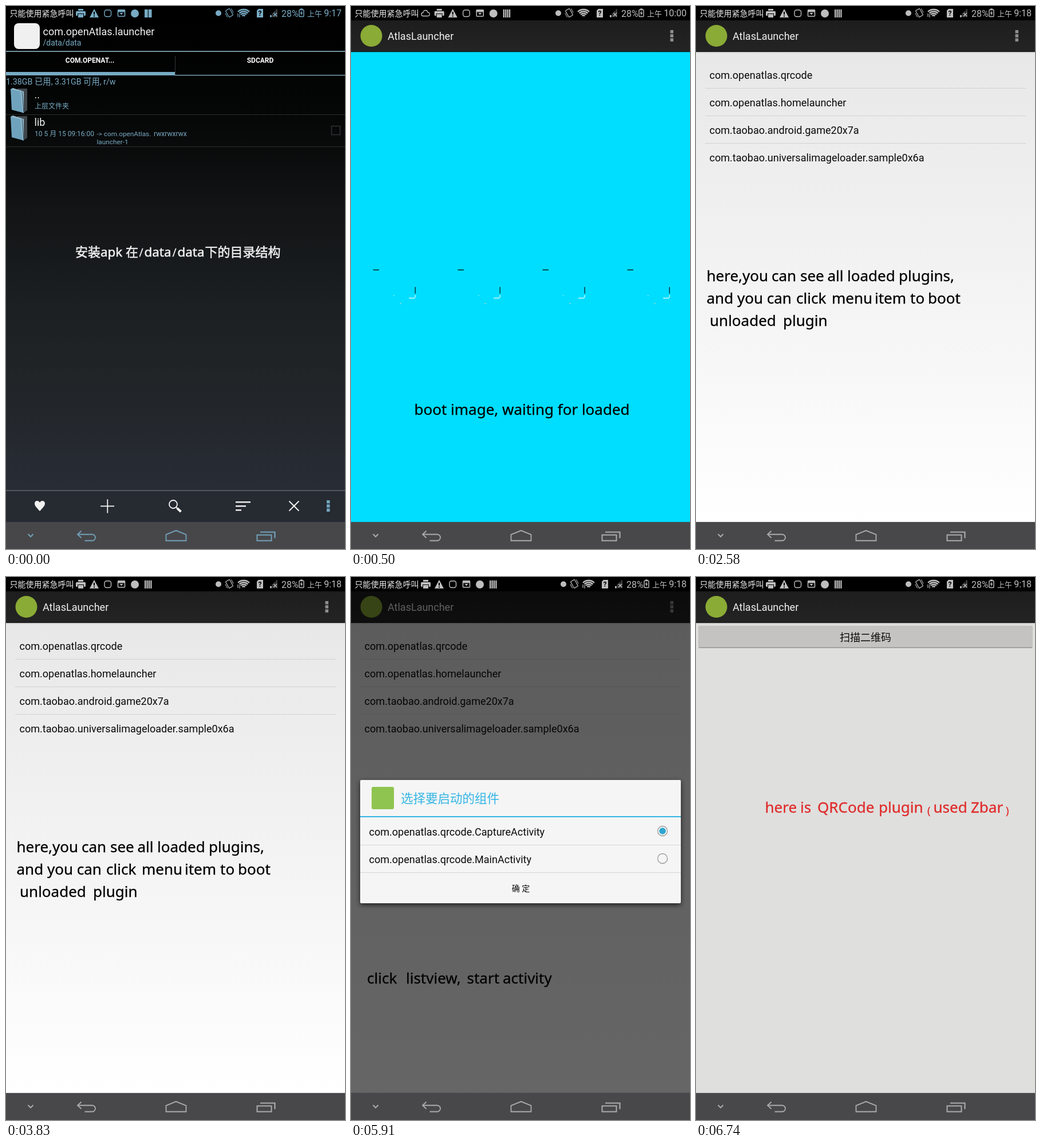
An HTML page with a canvas that plays this animation: 592x947 px, repeating every 8 s.

```html
<!DOCTYPE html>
<html lang="zh-CN">
<head>
<meta charset="utf-8">
<title>Plugin launcher demo</title>
<style>
html, body { margin: 0; width: 100%; height: 100%; overflow: hidden; background: #000; }
canvas { display: block; }
</style>
</head>
<body>
<canvas id="stage" width="592" height="947"></canvas>
<script>
const W = 592, H = 947, LOOP = 8000;
const g = document.getElementById('stage').getContext('2d');
const UI = 'Roboto, "Noto Sans CJK SC", "Noto Sans CJK", sans-serif';
const NOTE = '"Noto Sans", "Noto Sans CJK SC", "Noto Sans CJK", sans-serif';

function rect(x, y, w, h, color) {
  g.fillStyle = color;
  g.fillRect(x, y, w, h);
}

function text(s, x, y, size, color, align = 'left', weight = 400) {
  g.font = `${weight} ${size}px ${UI}`;
  g.textAlign = align;
  g.fillStyle = color;
  g.fillText(s, x, y);
}

// Caption words, given as [word, x] pairs on one baseline.
function note(words, y, color, size = 26, edge = 0.3) {
  g.font = `400 ${size}px ${NOTE}`;
  g.textAlign = 'left';
  g.fillStyle = g.strokeStyle = color;
  g.lineWidth = edge;
  for (const [s, x] of words) {
    g.fillText(s, x, y);
    g.strokeText(s, x, y);
  }
}

function path(pts, closed) {
  g.beginPath();
  for (let i = 0; i < pts.length; i += 2) g.lineTo(pts[i], pts[i + 1]);
  if (closed) g.closePath();
}

function poly(pts, color) {
  path(pts, true);
  g.fillStyle = color;
  g.fill();
}

function line(pts, color, width = 1, closed = false) {
  path(pts, closed);
  g.strokeStyle = color;
  g.lineWidth = width;
  g.stroke();
}

function disc(x, y, r, color) {
  g.beginPath();
  g.arc(x, y, r, 0, Math.PI * 2);
  g.fillStyle = color;
  g.fill();
}

function ring(x, y, r, color, width) {
  g.beginPath();
  g.arc(x, y, r, 0, Math.PI * 2);
  g.strokeStyle = color;
  g.lineWidth = width;
  g.stroke();
}

function round(x, y, w, h, r) {
  g.beginPath();
  g.roundRect(x, y, w, h, r);
}

function fade(y0, y1, ...stops) {
  const grad = g.createLinearGradient(0, y0, 0, y1);
  stops.forEach((c, i) => grad.addColorStop(i / (stops.length - 1), c));
  return grad;
}

function at(x, y, draw) {
  g.save();
  g.translate(x, y);
  draw();
  g.restore();
}

// ---- status bar ----

function cloud(c) {
  g.beginPath();
  g.moveTo(126, 17.5);
  g.arc(126, 14.5, 3, Math.PI / 2, Math.PI * 1.5);
  g.arc(130, 11.5, 4, Math.PI, Math.PI * 1.9);
  g.arc(134, 14.3, 3.2, -Math.PI / 2, Math.PI / 2);
  g.closePath();
  g.strokeStyle = c;
  g.lineWidth = 1.3;
  g.stroke();
}

function notices(c, bars) {
  // printer
  rect(126, 5, 9, 3, c);
  round(122, 9, 17, 8, 1.5);
  g.fillStyle = c;
  g.fill();
  rect(125, 13, 11, 7, '#000');
  rect(126, 14, 9, 6, c);
  // warning
  poly([154, 5, 162, 20, 146, 20], c);
  rect(153, 10, 2, 5, '#000');
  rect(153, 16.5, 2, 2, '#000');
  // app
  round(172, 7, 11.5, 11.5, 3.5);
  g.strokeStyle = c;
  g.lineWidth = 1.4;
  g.stroke();
  // inbox
  round(195.5, 7, 12, 11, 1);
  g.lineWidth = 1.5;
  g.stroke();
  rect(195, 6.5, 13, 4, c);
  poly([198.5, 12, 204.5, 12, 201.5, 15.5], c);
  // player
  disc(225, 13, 7, c);
  // bars
  const step = 13.6 / bars;
  for (let i = 0; i < bars; i++) rect(242 + i * step, 6, step - 1.1, 14, c);
}

function radios(c, arrows) {
  disc(371, 12.5, 5, c);
  // vibrate
  at(390, 12, () => {
    g.rotate(-0.5);
    round(-4, -6.5, 8, 13, 1);
    g.strokeStyle = c;
    g.lineWidth = 1.2;
    g.stroke();
    line([-6.5, -3, -6.5, 5], c, 1);
    line([6.5, -5, 6.5, 3], c, 1);
  });
  // wifi
  for (const r of [3.5, 7, 10.5, 14]) {
    g.beginPath();
    g.arc(415, 20, r, -Math.PI * 0.75, -Math.PI * 0.25);
    g.strokeStyle = c;
    g.lineWidth = 2.3;
    g.stroke();
  }
  if (arrows) {
    line([405, 13, 405, 19], c, 1.2);
    line([408, 14, 408, 20], c, 1.2);
  }
  // sim
  poly([441, 5, 449, 5, 449, 20, 438, 20, 438, 8], c);
  text('?', 443.5, 17, 12, '#000', 'center', 700);
  // signal
  for (let i = 0; i < 4; i++) rect(461 + i * 3.4, 16 - i * 3.5, 2.8, 3.5 + i * 3.5, i ? '#3c3c3c' : c);
  line([467, 12, 473, 18], c, 1.4);
  line([473, 12, 467, 18], c, 1.4);
  text('28%', 481, 18.5, 16, c);
  // battery
  rect(514, 4.5, 4, 2, c);
  round(512, 6.5, 8, 12, 1);
  g.strokeStyle = c;
  g.lineWidth = 1.4;
  g.stroke();
  poly([517, 8, 513.5, 13, 515.6, 13, 514.7, 17, 518.4, 11.8, 516.3, 11.8], c);
  text('上午', 526, 18, 13, c);
}

function statusBar(time, c = '#bebebe', bars = 4, busy = false) {
  rect(0, 0, W, 25, '#000');
  text('只能使用紧急呼叫', 6.5, 17.5, 14, '#e8e8e8');
  if (busy) cloud(c);
  at(busy ? 23.7 : 0, 0, () => notices(c, bars));
  at(busy ? -9 : 0, 0, () => radios(c, !busy));
  text(time, 586, 18, 16, c, 'right');
}

// ---- shared chrome ----

function navBar(c = '#ababab', bg = '#48484a') {
  rect(0, 899.84, W, 48, bg);
  line([38.5, 921, 43, 925.5, 47.5, 921], c, 2);
  line([131.5, 915.5, 125, 921.5, 131.5, 927.5], c, 1.8);
  g.beginPath();
  g.moveTo(125, 921.5);
  g.lineTo(150.5, 921.5);
  g.arc(150.5, 927, 5.5, -Math.PI / 2, Math.PI / 2);
  g.lineTo(137.5, 932.5);
  g.stroke();
  line([279.5, 921.8, 297, 914.8, 314.5, 921.8, 314.5, 932.5, 279.5, 932.5], c, 1.8, true);
  line([438.5, 922.5, 463.5, 922.5, 463.5, 932.5, 438.5, 932.5], c, 2, true);
  line([444, 917.5, 469.5, 917.5, 469.5, 928], c, 2.2);
}

function dots(x, y, c) {
  for (let i = 0; i < 3; i++) rect(x, y + i * 7.2, 5.5, 5.5, c);
}

function actionBar(menu = true) {
  rect(0, 25, W, 55, fade(25, 80, '#1d1d1d', '#242424'));
  rect(0, 79, W, 1, '#101010');
  rect(0, 80, W, 2, fade(80, 82, 'rgba(0,0,0,.25)', 'rgba(0,0,0,0)'));
  disc(35.5, 52, 19, '#8aab35');
  text('AtlasLauncher', 64, 59, 18, '#f0f0f0');
  if (menu) dots(557.5, 42, '#8e8e8e');
}

// ---- scenes ----

function folder(y) {
  at(0, y, () => {
    poly([20, 1, 37, 1, 37, 39, 31, 43, 20, 38], '#3f474c');
    poly([8, 2, 12, 0, 31, 6, 31, 44, 27, 42], '#94bccf');
    poly([8, 2, 25, 6, 29, 43, 10, 38], '#6fa3bd');
    line([28, 6, 31, 43], '#2c4653', 1);
  });
}

function fileTools() {
  const c = '#f2f2f2';
  rect(0, 845, W, 55, '#262a31');
  rect(0, 844.5, W, 1.2, '#6f7478');
  g.beginPath();
  g.moveTo(59, 881);
  g.bezierCurveTo(54, 875, 50, 872, 50, 867.5);
  g.bezierCurveTo(50, 862, 57, 861.5, 59, 866);
  g.bezierCurveTo(61, 861.5, 68, 862, 68, 867.5);
  g.bezierCurveTo(68, 872, 64, 875, 59, 881);
  g.fillStyle = c;
  g.fill();
  rect(165, 871.4, 24, 1.8, c);
  rect(176.4, 860.3, 1.8, 24, c);
  ring(292, 869, 7, c, 1.8);
  line([297, 874, 300, 877], c, 2);
  line([299, 876, 305.5, 882], c, 4);
  [26, 18, 10].forEach((w, i) => rect(401, 864 + i * 7, w, 2.4, c));
  line([494.5, 863.5, 511.5, 880.5], c, 2);
  line([511.5, 863.5, 494.5, 880.5], c, 2);
  dots(560, 862, '#72a6c0');
}

function files() {
  const blue = '#78abc4';
  rect(0, 0, W, 900, fade(25, 845, '#000', '#050606', '#121415', '#1b1f21', '#22262a', '#282c35'));
  statusBar('9:17', blue, 2);
  round(14, 30, 45, 45, 8);
  g.fillStyle = '#f0f0f0';
  g.fill();
  text('com.openAtlas.launcher', 64.5, 50.5, 18, '#f2f2f2');
  text('/data/data', 64.5, 69, 14, blue);
  rect(0, 78.4, W, 1.6, '#8db3c2');
  text('COM.OPENAT...', 146.5, 98.5, 12, '#fff', 'center', 700);
  text('SDCARD', 444, 98.5, 12, '#fff', 'center', 700);
  rect(295, 87, 1, 33, '#303436');
  rect(0, 115, 295, 6, blue);
  rect(295, 120, 297, 1.4, '#7fa6b5');
  text('1.38GB 已用, 3.31GB 可用, r/w', 0, 137, 14.3, blue);

  folder(143);
  text('..', 49.5, 161, 18, '#f2f2f2');
  text('上层文件夹', 50, 179, 12, blue);
  rect(0, 189, W, 1, '#2a2d2e');
  folder(191);
  text('lib', 49.5, 209, 18, '#f2f2f2');
  text('10 5 月 15 09:16:00', 50, 227, 12, blue);
  text('-> com.openAtlas.', 158.5, 227, 11.8, blue);
  text('launcher-1', 158.5, 241, 11.8, blue);
  text('rwxrwxrwx', 258, 227, 12.1, blue);
  rect(0, 245, W, 1, '#2a2d2e');
  line([568.5, 209.5, 583.5, 209.5, 583.5, 224.5, 568.5, 224.5], '#303234', 1.5, true);

  note([['安装', 121], ['在', 209], ['下的目录结构', 347.5]], 437, '#eee', 22, 0.6);
  note([['apk', 165], ['data', 241.5], ['data', 299.5]], 437, '#eee', 22.4, 0.6);
  note([['/', 232.5], ['/', 290.5]], 437, '#eee', 19);
  fileTools();
  navBar('#72a2ba', '#47474a');
}

function boot() {
  rect(0, 80, W, 820, '#00deff');
  statusBar('10:00', undefined, 4, true);
  actionBar();
  for (let i = 0; i < 4; i++) {
    at(i * 148, 0, () => {
      rect(38.5, 459.5, 10.5, 1.6, '#0a2a30');
      rect(111.5, 490, 1.4, 11.5, '#0a2a30');
      line([101, 509.5, 110, 509.5, 112, 508, 112.3, 504], '#d5f6fa', 1.3);
      rect(74, 504, 1.5, 1.5, '#9ceef8');
      rect(85.5, 518, 2, 2, '#9fd8c8');
    });
  }
  note([['boot image, waiting for loaded', 110.5]], 713, '#000');
  navBar();
}

function pluginList() {
  rect(0, 80, W, 820, fade(80, 900, '#e8e8e8', '#ffffff'));
  statusBar('9:18');
  actionBar();
  const names = ['com.openatlas.qrcode', 'com.openatlas.homelauncher',
    'com.taobao.android.game20x7a', 'com.taobao.universalimageloader.sample0x6a'];
  names.forEach((s, i) => {
    text(s, 23.5, 126.5 + i * 48, 18.05, '#0a0a0a');
    if (i) rect(16, 95 + i * 48, 560, 1, '#d2d2d2');
  });
  navBar();
}

function listing() {
  pluginList();
  note([['here,you', 18.5], ['can', 132], ['see', 182], ['all', 229.5], ['loaded', 264], ['plugins,', 354]], 479.5, '#000');
  note([['and you can', 18.5], ['click', 175], ['menu', 237], ['item', 312], ['to', 374], ['boot', 405]], 519, '#000');
  note([['unloaded', 24], ['plugin', 152]], 558, '#000');
}

function chooser() {
  pluginList();
  rect(0, 25, W, 875, 'rgba(0,0,0,.6)');
  navBar();
  g.save();
  g.shadowColor = 'rgba(0,0,0,.7)';
  g.shadowBlur = 8;
  g.shadowOffsetY = 3;
  round(16, 354, 560, 215, 2);
  g.fillStyle = '#f5f5f5';
  g.fill();
  g.restore();
  round(36, 366, 39, 39, 3);
  g.fillStyle = '#8fc450';
  g.fill();
  text('选择要启动的组件', 87, 394, 21.5, '#33b5e5');
  rect(16, 417, 560, 2, '#33b5e5');
  ['CaptureActivity', 'MainActivity'].forEach((s, i) => {
    const y = 443 + i * 48;
    text('com.openatlas.qrcode.' + s, 31.5, y + 7.5, 18.05, '#0a0a0a');
    ring(544, y, 8.5, '#9a9a9a', 1.3);
    rect(16, y + 24, 560, 1, '#d6d6d6');
  });
  disc(544, 443, 5.8, '#2fa6d0');
  text('确 定', 296.5, 548, 14, '#0a0a0a', 'center');
  note([['click', 28], ['listview,', 96], ['start', 202.5], ['activity', 265]], 708.5, '#000');
}

function scanner() {
  const red = '#e02b2b';
  rect(0, 80, W, 820, '#dfdfdd');
  statusBar('9:18');
  actionBar(false);
  round(4, 85, 584, 39, 2);
  g.fillStyle = '#c5c3c1';
  g.fill();
  rect(5, 122.5, 582, 1.5, '#979694');
  text('扫描二维码', 296, 111.5, 18, '#0a0a0a', 'center');
  note([['here', 120.5], ['is', 182], ['QRCode', 212], ['plugin', 319], ['used', 414.5], ['Zbar', 480]], 410.5, red);
  note([['(', 404], [')', 541]], 414, red, 18);
  navBar();
}

const scenes = [[0, files], [500, boot], [2580, listing], [4660, chooser], [6740, scanner]];
let shown;

function tick() {
  const t = performance.now() % LOOP;
  const draw = scenes.filter(([start]) => t >= start).pop()[1];
  if (draw !== shown) {
    g.clearRect(0, 0, W, H);
    draw();
    shown = draw;
  }
  requestAnimationFrame(tick);
}
tick();
</script>
</body>
</html>
```
